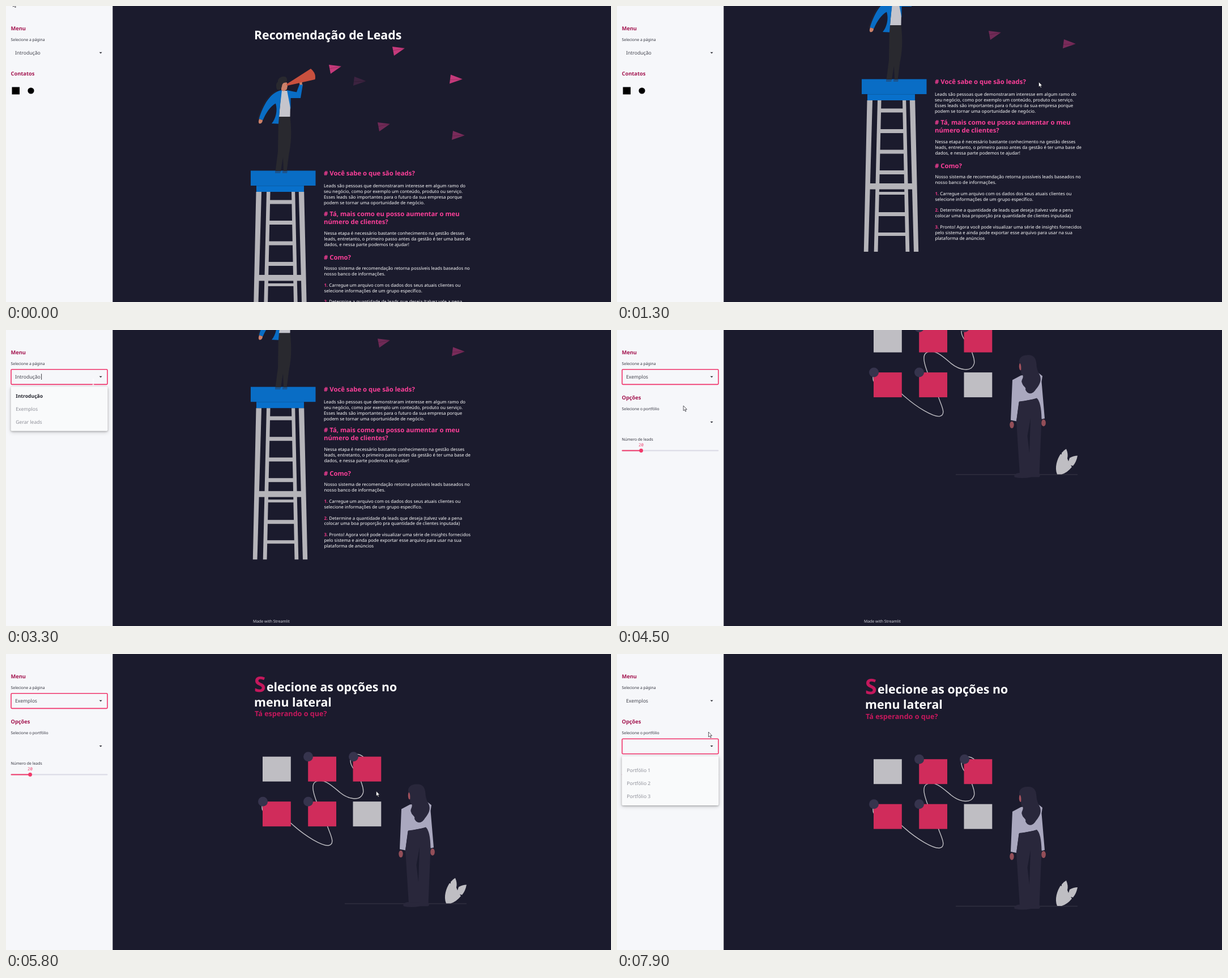
Animation of 1068 by 524 pixels, one loop 8 s. Source, as an HTML page:

```html
<!DOCTYPE html>
<html lang="pt">
<head>
<meta charset="utf-8">
<title>Recomendação de Leads</title>
<style>
html, body { margin: 0; width: 100%; height: 100%; overflow: hidden; background: #1b1b2d; }
svg { display: block; width: 1068px; height: 524px; }
text { font-family: "Noto Sans", "Open Sans", sans-serif; fill: #fff; white-space: pre; text-rendering: geometricPrecision; }
.h1 { font-size: 21.3px; font-weight: 700; }
.h2 { font-size: 11.32px; font-weight: 700; fill: #fb3f98; }
.p { font-size: 7.87px; }
.num { fill: #ee3a88; font-weight: 600; }
.rose { font-weight: 700; fill: #c4185c; }
.foot { font-size: 6.88px; fill: #d5d6dc; }
.side { font-size: 9.3px; font-weight: 700; fill: #a3154f; }
.label { font-size: 6.87px; fill: #33343f; }
.value { font-size: 8.65px; fill: #44454f; }
.opt { font-size: 8.6px; fill: #8f9099; }
.on { font-weight: 700; fill: #262730; }
.mono { font: 7.5px "Noto Sans Mono", "DejaVu Sans Mono", monospace; fill: #ee4470; text-anchor: middle; }
.focus { fill: none; stroke: #f0336b; stroke-width: 1.6; }
.menu { fill: #f9fafb; filter: drop-shadow(0 1px 1.5px rgba(0,0,0,.25)) drop-shadow(0 2px 3px rgba(0,0,0,.18)); }
</style>
</head>
<body>
<svg id="stage" viewBox="0 0 1068 524" xmlns="http://www.w3.org/2000/svg"></svg>
<script>
const LOOP = 8000, STEP = 100;
const BLUE = '#096dc5', DARK = '#29292f', SKIN = '#cb8069', STEEL = '#b5b4b9';
const GRAY = '#bfbec3', RED = '#d02c5b', NIGHT = '#29273b', BG = '#1b1b2d';

const text = (x, y, cls, s, more = '') => `<text x="${x}" y="${y}" class="${cls}" ${more}>${s}</text>`;
const lines = (x, y, gap, cls, rows) => rows.map((s, i) => text(x, y + i * gap, cls, s)).join('');
const rect = (x, y, w, h, fill, more = '') => `<rect x="${x}" y="${y}" width="${w}" height="${h}" fill="${fill}" ${more}/>`;
const path = (d, fill, more = '') => `<path d="${d}" fill="${fill}" ${more}/>`;
const disc = (x, y, r, fill) => `<circle cx="${x}" cy="${y}" r="${r}" fill="${fill}"/>`;
const oval = (x, y, rx, ry, fill) => `<ellipse cx="${x}" cy="${y}" rx="${rx}" ry="${ry}" fill="${fill}"/>`;
const group = (id, body) => `<g id="${id}">${body}</g>`;
const item = n => `<tspan class="num">${n}.</tspan> `;

function ladder() {
  const leg = (a, b, c, d) => path(`M${a},329H${b}L${d},597H${c}Z`, STEEL);
  const rung = (y, h) => {
    const k = (y - 329) / 268;
    const left = 463 - 6 * k, right = 507 + 6 * k;
    return rect(left, y, right - left, h, STEEL);
  };
  return leg(460, 466.5, 453.7, 460.5) + leg(504, 510.2, 509.5, 516.3) +
    [343.5, 380, 416.5, 453, 527, 563].map(y => rung(y, 7 - (y > 560))).join('') + rung(491, 5) +
    leg(441.5, 451, 435.8, 443.5) + leg(516.8, 526.2, 524, 532.2) + rect(439.5, 476, 89.5, 10.5, STEEL) +
    rect(442, 317, 84, 12, '#0870cb') + rect(442, 317, 84, 2, '#0a5ea9') + rect(432, 291.5, 114.5, 26.5, BLUE);
}

function speaker() {
  return path('M481,196H501.5C505,225 503,245 499.5,262L495.5,293H490L489,268 485,293H475.5L480,258Z', DARK) +
    path('M475,292H485L484,296H475ZM488,292H497L496,296H488Z', '#1a5590') +
    path('M486,150H497L502,170 501.5,196H482Z', '#c5c5cc') +
    path('M496,149 513,152.5 518,139H524L520,163H502.5V183Z', BLUE) +
    path('M487,149C467,152 454,175 446.5,200L453.5,202C459,189 467,177 476,172.5C480,185 476,200 469,208L481,208.5 483,184Z', BLUE) +
    path('M478,151C462,157 452,177 445,200', 'none', 'stroke="#2c2d36" stroke-width=".8"') +
    path('M447,200 453,202C453,206 450,209 447,208C445,206 446,203 447,200Z', SKIN) +
    path('M486,140 490,135 496,135.5 497,142 495.5,148 490,151 486,149Z', SKIN) +
    path('M478,147C476,141 477,136 480,134C479,126 492,122 495,127C498,132 495,136 490.5,136C486,138 488,144 485,147C482,149 480,149 478,147Z', DARK) +
    path('M495,138.5 538,111Q548,119 545.5,130L496.5,141Z', '#c8503e') +
    path('M518,136 522.5,134.5 523,139.5H518.5Z', SKIN);
}

// Paper planes: position, colour, tilted or level.
const planes = [
  [570, 104, '#c53a7b', 1], [682, 72, '#c53a7b', 1], [656, 206, '#6f2a56', 1],
  [613, 125, '#3c2340', 0], [783, 121.5, '#c53a7b', 0], [787, 221, '#792b5a', 0]
].map(([x, y, fill, tilt]) => `<g transform="translate(${x} ${y})">` + (tilt
  ? path('M0,0 22,2.8 3,16Z', fill) + path('M1,7 22,2.8', 'none', 'stroke="#0004" stroke-width=".7"')
  : path('M2,0 23,8 0,16Z', fill) + path('M1,9 23,8', 'none', 'stroke="#0004" stroke-width=".7"')) + '</g>').join('');

const foot = text(436, 708.4, 'foot', 'Made with Streamlit');

const intro = text(438, 59, 'h1', 'Recomendação de Leads') + planes + ladder() + speaker() +
  text(561, 300.2, 'h2', '# Você sabe o que são leads?') +
  lines(561, 321, 9.9, 'p', [
    'Leads são pessoas que demonstraram interesse em algum ramo do',
    'seu negócio, como por exemplo um conteúdo, produto ou serviço.',
    'Esses leads são importantes para o futuro da sua empresa porque',
    'podem se tornar uma oportunidade de negócio.']) +
  lines(561, 371.5, 14.2, 'h2', ['# Tá, mais como eu posso aumentar o meu', 'número de clientes?']) +
  lines(561.5, 405.3, 9.9, 'p', [
    'Nessa etapa é necessário bastante conhecimento na gestão desses',
    'leads, entretanto, o primeiro passo antes da gestão é ter uma base de',
    'dados, e nessa parte podemos te ajudar!']) +
  text(561, 448.6, 'h2', '# Como?') +
  lines(561.5, 467, 9.9, 'p', [
    'Nosso sistema de recomendação retorna possíveis leads baseados no',
    'nosso banco de informações.', '',
    item(1) + 'Carregue um arquivo com os dados dos seus atuais clientes ou',
    'selecione informações de um grupo específico.', '',
    item(2) + 'Determine a quantidade de leads que deseja (talvez vale a pena',
    'colocar uma boa proporção pra quantidade de clientes inputada)', '',
    item(3) + 'Pronto! Agora você pode visualizar uma série de insights fornecidos',
    'pelo sistema e ainda pode exportar esse arquivo para usar na sua',
    'plataforma de anúncios']) + foot;

function board() {
  const cord = 'M454,266C450,276 452,284 460,288C480,290 492,295 503,304C530,329 558,344 569,343.5C584,341 570,320 566,305' +
    'M549,268C543,252 538,236 546,231C560,222 577,239 590,250C605,262 626,266 630.5,250C632,242 628,236 626,228' +
    'M613,207C606,197 606,184 615,182C623,181 628,184 632,188';
  const tile = (c, r, fill) => rect([453, 533.2, 612.5][c], [186.2, 265.7][r], 49.8, 44, fill);
  return path(cord, 'none', `stroke="${GRAY}" stroke-width="1.4"`) +
    [GRAY, RED, RED, RED, RED, GRAY].map((f, i) => tile(i % 3, i / 3 | 0, f)).join('') +
    [[533.5, 186.2], [613.5, 186.2], [453.5, 265.7], [533.5, 265.7]].map(([x, y]) => disc(x, y, 8.5, '#36344d')).join('');
}

function viewer() {
  return rect(598, 445.8, 215, 1.4, '#313040') +
    oval(697, 358.5, 3.7, 6.2, '#934e58') + oval(753, 355, 3.9, 6.2, '#934e58') +
    path('M698,279 713,271 744,266.5 751,272 749.5,282 755,347 749.5,348.5 745,325 741,312 709.5,318 705,352 695,350Z', '#aaa8bf') +
    path('M710,317Q728,315 741,311Q749,318 749.5,348L745.5,447H711L705,352Z', NIGHT) +
    path('M730,347 724.5,378 728,408Z', BG) +
    path('M701,449C703,444 709,443 713,444H729L732,447 745,444Q749,448 745,451L731,451Q715,454 702,451Z', NIGHT) +
    oval(712.5, 255, 2.7, 7, '#a4525d') +
    path('M710,249C709,241 714,235 724,235C736,234 740,241 740.5,252C741,261 744,265 747,272C750,282 744,290 739,296C733,306 724,304 721,296C723,292 716,290 715,284C712,279 721,274 714,268C712,263 715,256 712,250Z', NIGHT) +
    path('M777,446C772,434 777,419 783,410L785,411 785,408Q789,403 793,401Q797,410 795,418L797,423 799,417Q806,413 813,413Q811,424 805,431L801,430 803,433Q795,443 785,446Z', GRAY);
}

const examples = text(438, 71, 'rose', 'S', 'font-size="37.5"') +
  text(460, 70, 'h1', 'elecione as opções no') + text(438, 97, 'h1', 'menu lateral') +
  text(439, 114.6, 'rose', 'Tá esperando o que?', 'font-size="12.6"') +
  board() + viewer() + foot;

const drop = y => path(`M164.6,${y}h5l-2.5,2.6Z`, '#262730');
const focus = (id, y) => `<rect id="${id}" class="focus" x="9" y="${y}" width="170" height="26.6" rx="1.6"/>`;
const panel = (y, h) => `<rect class="menu" x="8.5" y="${y}" width="171" height="${h}" rx="2"/>`;

const sidebar = rect(0, 0, 188.3, 524, '#f6f7fa') +
  text(8.5, 43.3, 'side', 'Menu') + text(8.5, 62.3, 'label', 'Selecione a página') +
  text(16, 86.2, 'value', '', 'id="page"') + drop(81.7) + focus('focus1', 69.8) +
  group('contacts', text(8.5, 123.4, 'side', 'Contatos') + rect(10.5, 143.5, 13.5, 13, '#000') + disc(44, 150, 5.6, '#000')) +
  group('options', text(8.5, 123.4, 'side', 'Opções') + text(8.5, 142.3, 'label', 'Selecione o portfólio') + drop(162) +
    text(8.5, 196.2, 'label', 'Número de leads') + text(42.6, 205.8, 'mono', '20') +
    rect(8.5, 212.4, 171, 2.2, '#dadae6', 'rx="1"') + rect(8.5, 212.4, 34, 2.2, '#f23a6b', 'rx="1"') +
    disc(42.6, 213.5, 3.4, '#f23a6b') + focus('focus2', 150.2)) +
  group('menu1', rect(62.2, 77.5, .9, 10.5, '#262730') + panel(100.3, 78.5) +
    `<rect id="hover" x="8.5" y="128" width="171" height="23" fill="#eceef3"/>` +
    text(17.3, 119.7, 'opt on', 'Introdução') + text(17.3, 142.7, 'opt', 'Exemplos') + text(17.3, 165.8, 'opt', 'Gerar leads')) +
  group('menu2', panel(180.8, 87.3) + lines(17.3, 209.2, 23, 'opt', ['Portfólio 1', 'Portfólio 2', 'Portfólio 3']));

const stage = document.getElementById('stage');
stage.innerHTML = rect(0, 0, 1068, 524, BG) + group('intro', intro) + group('examples', examples) +
  group('status', rect(941.5, -8, 102.5, 11.5, '#c3c4ca', 'rx="1.5"') + rect(1008, -8, 36, 12.5, '#ececf0', 'rx="1.5"') +
    rect(952, -2, 1, 4, '#55565f') + rect(954, -2, 1, 4, '#55565f')) +
  sidebar +
  group('cursor', path('M0,0V8.8L2,7 3.5,10.3 4.9,9.6 3.4,6.5H6.2Z', '#fff', 'id="arrow" stroke="#1c1c24" stroke-width=".7"') +
    path('M-1.5,0H1.5M0,0V10M-1.5,10H1.5', 'none', 'id="beam" stroke="#fff"'));

// Rows: time, values; straight between rows.
const introScroll = [[900, 0], [1000, 36.6], [1100, 88], [1200, 130], [1300, 162], [1400, 182], [1500, 190.8]];
const exampleScroll = [[5500, 190.6], [5600, 118], [5700, 38], [5800, 4.5], [5900, 0]];
const pointer = [
  [200, 12.5, -7.5], [300, 40, 4], [500, 300, 70], [700, 610, 122], [900, 744.5, 134.5],
  [2300, 744.5, 134.5], [2600, 480, 147], [2900, 230, 118], [3100, 154, 87],
  [3400, 154, 87], [3700, 130, 122], [3900, 112, 138], [4400, 112, 138], [4900, 138, 118],
  [5100, 150, 122], [5300, 285, 165], [5400, 653.5, 242.8], [5800, 653.5, 242.8],
  [6100, 330, 215], [6400, 57, 195], [6500, 189, 122], [6600, 150, 158], [7100, 150, 158],
  [7400, 152, 215], [7600, 158, 190], [7900, 161.5, 138]
];

function at(rows, t) {
  const i = rows.findIndex(r => r[0] > t);
  if (i < 0) return rows[rows.length - 1].slice(1);
  if (i === 0) return rows[0].slice(1);
  const a = rows[i - 1], b = rows[i], k = (t - a[0]) / (b[0] - a[0]);
  return a.slice(1).map((v, j) => v + (b[j + 1] - v) * k);
}

const $ = id => document.getElementById(id);
const show = (id, on) => { $(id).style.display = on ? '' : 'none'; };
const within = (t, a, b) => t >= a && t < b;
const move = (id, x, y) => $(id).setAttribute('transform', `translate(${x} ${y})`);

function draw(t) {
  const swapped = t >= 4500;
  show('intro', !swapped);
  show('contacts', !swapped);
  show('examples', swapped);
  show('options', swapped);
  move('intro', 0, -at(introScroll, t)[0]);
  move('examples', 0, -at(exampleScroll, t)[0]);
  show('status', within(t, 4600, 5100));
  $('page').textContent = t < 4000 ? 'Introdução' : 'Exemplos';
  show('focus1', within(t, 3200, 7000));
  $('focus1').style.opacity = t < 6900 ? 1 : .4;
  show('focus2', t >= 6900);
  show('menu1', within(t, 3300, 4000));
  show('hover', t >= 3800);
  show('menu2', t >= 7200);
  const [x, y] = at(pointer, t);
  move('cursor', x, y);
  const beam = within(t, 1800, 2000) || within(t, 3100, 3600) || within(t, 6600, 7200);
  show('beam', beam);
  show('arrow', !beam);
}

let start;
function tick(now) {
  start ??= now;
  const t = (now - start) % LOOP;
  draw(Math.floor(t / STEP) * STEP);
  requestAnimationFrame(tick);
}
draw(0);
requestAnimationFrame(tick);
</script>
</body>
</html>
```
